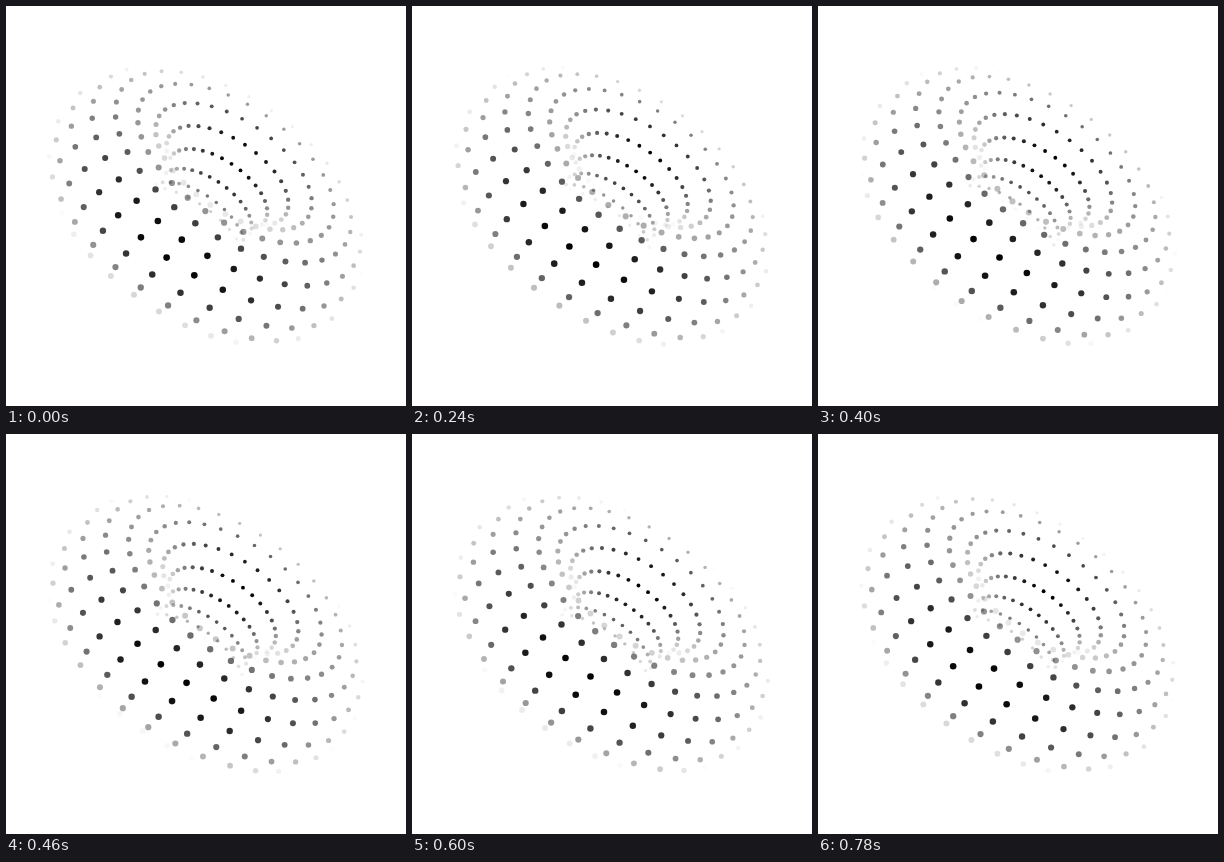
Write an HTML page with a canvas that moves like this. It is 400x400 px and loops after 0.8 s.

```html
<!DOCTYPE html>
<html lang="en">
<head>
<meta charset="utf-8">
<title>Dotted torus</title>
<style>
  html, body { margin: 0; width: 100%; height: 100%; overflow: hidden; background: #fff; }
  canvas { display: block; width: 400px; height: 400px; }
</style>
</head>
<body>
<canvas id="stage" width="400" height="400"></canvas>
<script>
const ctx = document.getElementById('stage').getContext('2d');
const { sin, cos, PI } = Math;
const rad = degrees => degrees * PI / 180;

const LOOP = 800, TICK = 20;
const RING = 112, TUBE = 60;
const TILT = rad(60), ROLL = rad(35);
const PER_TURN = 16, TURNS = 32, COUNT = PER_TURN * TURNS;
const TUBE_STEP = 2 * PI / PER_TURN, RING_STEP = 2 * PI / COUNT;
const TUBE_START = rad(-1), RING_START = rad(-91.6);

// The dots form one helix around the torus; a loop moves each dot
// onto the place of the dot almost one turn behind it.
function dotAt(index, progress) {
  const tube = TUBE_START + (index + progress) * TUBE_STEP;
  const ring = RING_START + (index - progress * (PER_TURN - 1)) * RING_STEP;
  const reach = RING + TUBE * cos(tube);
  const along = reach * cos(ring);
  const across = reach * sin(ring) * cos(TILT) + TUBE * sin(tube) * sin(TILT);
  return {
    x: 200 + along * cos(ROLL) + across * sin(ROLL),
    y: 200 + along * sin(ROLL) - across * cos(ROLL),
    depth: TUBE * sin(tube) * cos(TILT) - reach * sin(ring) * sin(TILT),
    facing: sin(tube) * cos(TILT) - cos(tube) * sin(ring) * sin(TILT)
  };
}

function draw(time) {
  const progress = Math.floor(time % LOOP / TICK) * TICK / LOOP;
  ctx.fillStyle = '#fff';
  ctx.fillRect(0, 0, 400, 400);
  for (let i = 0; i < COUNT; i++) {
    const dot = dotAt(i, progress);
    if (dot.facing <= 0) continue;
    ctx.fillStyle = `rgba(0, 0, 0, ${dot.facing ** 1.3})`;
    ctx.beginPath();
    ctx.arc(dot.x, dot.y, 2.2 + dot.depth * 0.0072, 0, 2 * PI);
    ctx.fill();
  }
}

const start = performance.now();
function frame() {
  draw(performance.now() - start);
  requestAnimationFrame(frame);
}
draw(0);
requestAnimationFrame(frame);
</script>
</body>
</html>
```
